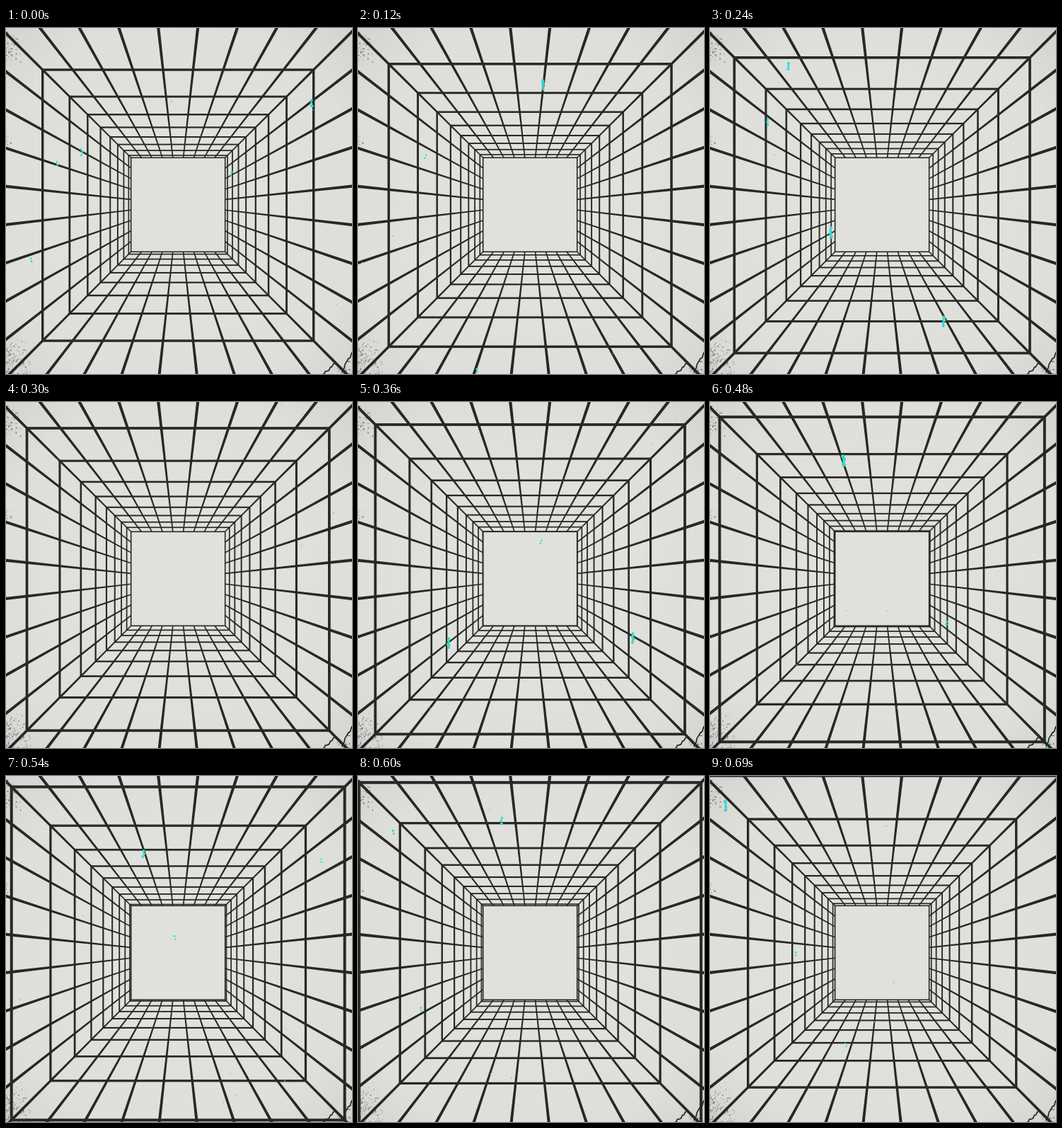
An HTML page with a canvas that plays this animation: 489x489 px, repeating every 720 ms.

```html
<!DOCTYPE html>
<html>
<head>
<meta charset="utf-8">
<style>
html, body { margin: 0; width: 100%; height: 100%; overflow: hidden; background: #e0e1dc; }
canvas { display: block; }
</style>
</head>
<body>
<canvas id="stage" width="489" height="489"></canvas>
<script>
const SIZE = 489, LOOP = 720, TICK = 30, CELLS = 9;
const CX = 243.2, CY = 249.4, TILT = 0.006; // vanishing point and slight downward lean
const BACK = 66.5, FRONT = 264;
const NEAR = 0.005222, GAP = 0.0013; // ring spacing is even in 1 / half-size
const INK = '#272723', SOFT = 'blur(0.6px)';
const ctx = document.getElementById('stage').getContext('2d');

function seeded(seed) {
  let s = seed * 7919 + 17;
  return () => (s = (s * 16807) % 2147483647) / 2147483647;
}

function blob(c, x, y, w, h) {
  c.beginPath();
  c.ellipse(x, y, w / 2, h / 2, 0, 0, 7);
  c.fill();
}

const lineWidth = half => 0.65 + half * 0.0142;
const project = (u, v, half) => [CX + u * half, CY + (v + TILT) * half];

// A grid line along the tunnel, widening towards the viewer
function rail(c, u, v) {
  const len = Math.hypot(u, v);
  c.beginPath();
  for (const [half, side] of [[BACK, 1], [FRONT, 1], [FRONT, -1], [BACK, -1]]) {
    const [x, y] = project(u, v, half), w = side * lineWidth(half) / 2 / len;
    c.lineTo(x - v * w, y + u * w);
  }
  c.fill();
}

function ring(half) {
  const [x, y] = project(-1, -1, half);
  ctx.lineWidth = lineWidth(half);
  ctx.strokeRect(x, y, half * 2, half * 2);
}

function dirt(c, rnd, x, y, spread, count) {
  for (let i = 0; i < count; i++) {
    c.fillStyle = `rgba(45,45,41,${0.1 + rnd() * 0.5})`;
    const px = x + (rnd() - rnd()) * spread, py = y + (rnd() - rnd()) * spread;
    blob(c, px, py, 0.6 + rnd() * 2, 0.6 + rnd() * 2);
  }
}

// A jagged line wandering from one point to another
function crack(c, rnd, x0, y0, x1, y1) {
  c.beginPath();
  for (let t = 0; t <= 1; t += 0.125) {
    c.lineTo(x0 + (x1 - x0) * t + (rnd() - 0.5) * 4, y0 + (y1 - y0) * t + (rnd() - 0.5) * 4);
  }
  c.stroke();
}

function makeBackdrop() {
  const canvas = document.createElement('canvas');
  canvas.width = canvas.height = SIZE;
  const c = canvas.getContext('2d'), rnd = seeded(5);
  const paper = c.createRadialGradient(CX, CY, 130, CX, CY, 350);
  paper.addColorStop(0, '#e0e1dc');
  paper.addColorStop(0.6, '#dedfda');
  paper.addColorStop(1, '#d3d4cf');
  c.fillStyle = paper;
  c.fillRect(0, 0, SIZE, SIZE);

  c.filter = SOFT;
  dirt(c, rnd, 0, 474, 36, 340);
  dirt(c, rnd, 0, 28, 24, 110);
  dirt(c, rnd, 0, 158, 8, 24);
  dirt(c, rnd, 482, 486, 24, 70);
  c.strokeStyle = INK;
  c.lineWidth = 1.7;
  crack(c, rnd, 489, 456, 474, 489);
  crack(c, rnd, 463, 475, 448, 489);

  c.fillStyle = INK;
  for (let i = 0; i <= CELLS; i++) {
    const u = i * 2 / CELLS - 1;
    rail(c, u, -1);
    rail(c, u, 1);
    if (i % CELLS) {
      rail(c, -1, u);
      rail(c, 1, u);
    }
  }
  return canvas;
}

// A fresh scatter of paint on every tick: mostly dots, now and then a drip
function drawFlecks(tick) {
  const rnd = seeded(tick + 40);
  ctx.fillStyle = `hsl(${168 + rnd() * 12} 68% 53%)`;
  for (let i = 0; i < 9; i++) {
    const x = rnd() * SIZE, y = rnd() * SIZE, size = 1.4 + 4 * rnd() ** 4;
    const drops = Math.ceil(size - 1.5);
    for (let d = 0; d < drops; d++) {
      blob(ctx, x + rnd() * 2, y + d * 4, size * (0.6 + rnd() * 0.5), size);
    }
    if (!drops) blob(ctx, x, y, size, size * 1.2);
  }
}

const backdrop = makeBackdrop();

function draw(now) {
  const tick = Math.floor((now % LOOP) / TICK);
  ctx.filter = 'none';
  ctx.drawImage(backdrop, 0, 0);
  ctx.filter = SOFT;
  ctx.strokeStyle = INK;
  const first = NEAR - GAP * tick * TICK / LOOP;
  for (let depth = first; depth < 1 / BACK; depth += GAP) ring(1 / depth);
  ring(BACK);
  drawFlecks(tick);
}

const start = performance.now();
function loop() {
  draw(performance.now() - start);
  requestAnimationFrame(loop);
}
loop();
</script>
</body>
</html>
```
